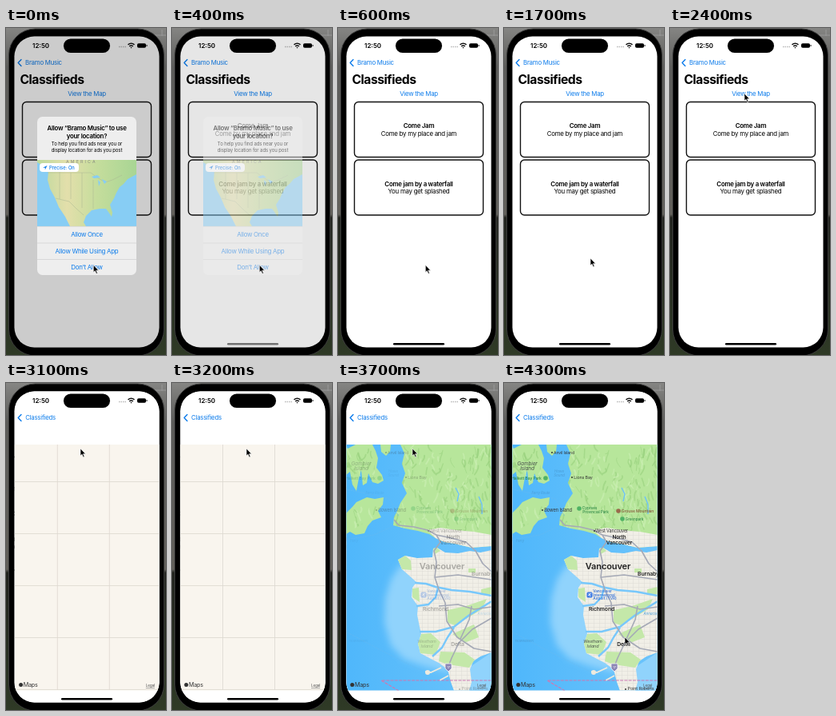
These frames come from a looping animation (200 by 409 pixels, 4.86 s). An HTML page:

```html
<!DOCTYPE html>
<html lang="en">
<head>
<meta charset="utf-8">
<title>Classifieds and map</title>
<style>
html, body { margin: 0; height: 100%; overflow: hidden; background: #333; }
svg { display: block; width: 100vw; height: 100vh; }
text { font: 7.87px Inter, "Open Sans", sans-serif; letter-spacing: -.25px; white-space: pre; }
.mid { text-anchor: middle; }
.bold { font-weight: 600; }
.link { fill: #0d7ceb; }
.road { fill: none; stroke: #a5a9b6; stroke-width: 1.6; stroke-linejoin: round; }
</style>
</head>
<body>
<svg viewBox="0 0 200 409" preserveAspectRatio="none">
  <defs>
    <clipPath id="screen"><rect x="10.5" y="10.5" width="181" height="389" rx="25"/></clipPath>
    <clipPath id="alertBox"><rect x="39" y="111" width="124" height="198" rx="6.5"/></clipPath>
    <clipPath id="mapBox"><rect x="10" y="77" width="182" height="307.5"/></clipPath>
    <clipPath id="alertMap"><rect x="39" y="165" width="124" height="83"/></clipPath>
    <linearGradient id="desk" x2="0" y2="1">
      <stop stop-color="#858583"/><stop offset=".12" stop-color="#5c5c5a"/>
      <stop offset=".57" stop-color="#62605b"/><stop offset=".58" stop-color="#22241f"/>
      <stop offset="1" stop-color="#2f3a26"/>
    </linearGradient>
    <linearGradient id="country">
      <stop stop-color="#bcd99c"/><stop offset=".3" stop-color="#e3dfab"/>
      <stop offset=".6" stop-color="#c5dd9c"/><stop offset="1" stop-color="#a8d594"/>
    </linearGradient>
    <linearGradient id="sea"><stop stop-color="#4fb7fb"/><stop offset="1" stop-color="#6cc4fb"/></linearGradient>
    <filter id="soft" x="-30%" y="-30%" width="160%" height="160%"><feGaussianBlur stdDeviation="4"/></filter>
    <pattern id="streets" width="7" height="5" patternUnits="userSpaceOnUse">
      <rect width="7" height="5" fill="#f1efe7"/><path d="M0 .5H7M.5 0V5" stroke="#dddbd4" stroke-width=".5"/>
    </pattern>
    <path id="north" d="M78 77L83 88 80 101 84 113 80 125 86 138 78 150 74 160 70 168 69 178 84 182 100 185 114 189 122 194 133 199 146 201 167 206 192 204V77Z"/>
    <path id="city" d="M75 221L84 216 99 219 118 218 119 207 124 206 134 212 150 213 165 210 178 212 192 209V337L178 342 169 348 165 358 167 374 164 385H145L141 374 137 358 126 350 118 346 103 338 100 326 104 314 102 305 99 290 100 279 92 268 93 256 98 249 88 240 80 233Z"/>
    <g id="isles">
      <path d="M10 83L22 77H43L47 85 50 94 48 106 55 115 57 122 50 126 43 124 38 113 36 125 31 128 29 109 26 119 23 135 18 127 15 111 10 115Z"/>
      <path d="M53 77H66L65 86 60 91 54 86Z"/>
      <path d="M10 163L18 155 23 149 36 143 46 145 57 143 56 152 50 160 54 168 43 172 37 179 33 188 22 190 15 186 10 189Z"/>
    </g>
  </defs>

  <rect width="200" height="409" fill="url(#desk)"/>
  <path d="M185 9h15M195 2v8" stroke="#999"/>
  <rect x="3.5" y="1" width="194" height="409" rx="33" stroke="#3c3c3c"/>

  <g clip-path="url(#screen)">
    <rect x="10" y="10" width="182" height="390" fill="#fff"/>
    <g id="list">
      <text id="title" x="17.5" y="70" style="font-size:15.7px;font-weight:700;letter-spacing:-.5px">Classifieds</text>
      <text class="mid link" x="101" y="85">View the Map</text>
      <g fill="none" stroke="#111" stroke-width="1.4">
        <rect x="20.5" y="92.5" width="161" height="69" rx="5"/>
        <rect x="20.5" y="165" width="161" height="69" rx="5"/>
      </g>
      <g id="first" class="mid">
        <text class="bold" x="101" y="125">Come Jam</text>
        <text x="101" y="134.5">Come by my place and jam</text>
      </g>
      <g id="second" class="mid">
        <text class="bold" x="101" y="198">Come jam by a waterfall</text>
        <text x="101" y="207">You may get splashed</text>
      </g>
    </g>
    <g id="page">
      <rect x="10" y="10" width="182" height="390" fill="#fff"/>
      <rect x="10" y="77" width="182" height="307.5" fill="#f9f5ee"/>
      <path d="M63.5 77V384M128.5 77V384M10 123.5H192M10 188.5H192M10 253.5H192M10 318.5H192M10 383.5H192" stroke="#dcd8d0" stroke-width=".8"/>
      <g clip-path="url(#mapBox)">
        <g id="tiles">
          <rect x="10" y="77" width="182" height="308" fill="url(#sea)"/>
          <path d="M78 228L66 246 59 270 58 300 66 328 82 345 108 354 140 362V228Z" fill="#90d3fc" filter="url(#soft)"/>
          <path d="M165 385V355L192 337V385Z" fill="#90d3fc"/>
          <g fill="#b7e69b"><use href="#north"/><use href="#isles"/></g>
          <clipPath id="woods"><use href="#north"/><path d="M10 77H43L47 120 10 115ZM15 160L50 147 46 168 15 185Z"/></clipPath>
          <g id="hills" clip-path="url(#woods)" fill="none" stroke-linecap="round"/>
          <path d="M112 184L128 181 148 184 170 186 192 190V204L167 206 146 201 133 199 122 194Z" fill="url(#streets)"/>
          <path d="M147 131l4 8-2 9M176 142l4 10 0 12" fill="none" stroke="#6bc2f8" stroke-width="1.4"/>
          <use href="#city" fill="url(#streets)"/>
          <g fill="#c4e8a9">
            <path d="M75 221L84 216 91 222 92 234 80 233ZM119 207L124 206 128 210 121 214ZM103 338L100 326 104 314 116 313 128 324 122 340ZM137 284L160 279 186 270 180 283 160 295 146 303 137 300ZM143 314L170 302 176 318 158 325ZM128 336L158 337 171 346 164 356 137 352 126 348ZM93 257L101 256 102 274 93 268ZM163 232h9v5h-9ZM179 258l13-3v9h-13Z"/>
          </g>
          <path d="M96 250L110 251 122 255 142 259 165 261 192 266M98 279L113 277 122 268 125 256M102 311L122 311 145 305 163 291 192 273M118 342L130 331 137 318 145 306" fill="none" stroke="#78c8fb" stroke-width="2.4"/>
          <path d="M129 356l-13 6-7-1M138 366l-11 6" fill="none" stroke="#eeeade" stroke-width="1.8"/>
          <circle cx="112" cy="362" r="3" fill="#eeeade"/>
          <g class="road">
            <path d="M70 171L76 178 95 180 112 184 123 190 142 194 160 199 172 210 181 226 192 236"/>
            <path d="M123 190L128 199 120 210 123 224 121 243 126 258 134 275 136 298 149 318 170 332 192 336"/>
            <path d="M137 357L142 344 151 325 168 308 192 294M126 279L150 277 170 283 192 280M121 243L150 240 192 246M153 320L164 296 167 279"/>
          </g>
          <path d="M76 385L54 372H192" fill="none" stroke="#cc79b4" stroke-width="1.2" stroke-dasharray="4 1.3"/>
          <path d="M10 133L40 139 65 145 76 167M10 196L45 190 69 179M10 311L55 335 107 361" fill="none" stroke="#69b9ee" stroke-width=".6" stroke-dasharray="2 1"/>
          <path d="M134 351h8v6l-4 4-4-4Z" fill="#8c86b5" stroke="#fff" stroke-width=".7"/>
          <text class="mid" x="138" y="357.3" fill="#fff" style="font-size:4px">17</text>
        </g>
        <g id="labels">
          <g fill="#4fb364"><circle cx="52" cy="119" r="2.8"/><circle cx="94" cy="157" r="2.8"/><circle cx="148" cy="170" r="2.8"/></g>
          <circle cx="143" cy="160" r="2.8" fill="#9a6a4c"/>
          <rect x="103.5" y="261.5" width="7" height="7" rx="1.5" fill="#3e7be5"/>
          <path d="M105 266l4-3M106 263l2 4" stroke="#fff" stroke-width=".9"/>
          <g fill="#333"><circle cx="60" cy="87" r="1"/><circle cx="85" cy="118" r="1"/><circle cx="48" cy="159" r="1"/><circle cx="113" cy="185" r="1"/><circle cx="152" cy="383" r="1"/></g>
        </g>
      </g>
      <circle cx="17.8" cy="377.5" r="2.5" fill="#333"/>
      <text x="21" y="380.2" fill="#333" style="font-size:7.2px">Maps</text>
      <text x="174" y="380" fill="#555" text-decoration="underline" style="font-size:4.8px">Legal</text>
    </g>
    <path d="M19 39.5L15.2 43.5 19 47.5" fill="none" stroke="#0d7ceb" stroke-width="1.4" stroke-linecap="round" stroke-linejoin="round"/>
    <text id="backOld" class="link" x="24" y="46.3">Bramo Music</text>
    <text id="backNew" class="link" x="24" y="46.3">Classifieds</text>
    <text class="bold" x="33" y="24.8" style="font-size:8px;letter-spacing:0">12:50</text>
    <path d="M141 23.5h9" stroke="#bbb" stroke-width="1.5" stroke-dasharray="1.5 1"/>
    <path d="M152.5 20.9q4-3.4 8 0M154.2 22.9q2.3-1.9 4.6 0" fill="none" stroke="#111" stroke-width="1.5"/>
    <path d="M155.4 24.3q1.1-.8 2.2 0L156.5 25.6Z"/>
    <rect x="164" y="19.3" width="11" height="5.4" rx="1.8"/><rect x="175.6" y="21" width=".9" height="2"/>
    <rect id="dim" x="10" y="10" width="182" height="390"/>
    <rect id="homeBar" x="69" y="394" width="64" height="2.4" rx="1.2"/>
  </g>
  <rect x="72" y="13.5" width="58" height="17.5" rx="8.7"/>

  <g id="alert" clip-path="url(#alertBox)">
    <rect x="39" y="111" width="124" height="198" fill="#eee"/>
    <g class="mid">
      <text class="bold" x="101" y="128">Allow “Bramo Music” to use</text>
      <text class="bold" x="101" y="138">your location?</text>
      <g id="reason"></g>
    </g>
    <g clip-path="url(#alertMap)">
      <rect x="39" y="165" width="124" height="83" fill="#87cdf4"/>
      <path d="M39 165H163V183L152 189 147 195 142 199 138 206 135 213 130 221 133 231 132 236 128 230 125 226 117 226 107 228 100 235 97 243 100 248H80L74 236 66 224 61 212 55 201 52 190 53 180 44 171 39 168Z" fill="url(#country)"/>
      <path d="M52 181H106L114 187 124 193 133 190 145 184M62 213L79 217 88 226 97 234M67 180V214M81 181V214M95 181V225M109 190V226" fill="none" stroke="#a9b792" stroke-width=".5"/>
      <path d="M107 186l7-2 4 3-8 1ZM115 190l1 8 2-5ZM120 189l6 3-3 3ZM125 198l7-3" fill="#87cdf4"/>
      <text x="75" y="169" fill="#868a80" style="font-size:5.2px;letter-spacing:2.2px">AMERICA</text>
    </g>
    <rect x="42" y="169" width="49" height="11" rx="4" fill="#fff"/>
    <path class="link" d="M46 174.7L51.5 172 48.8 177.5V174.7Z"/>
    <text class="link" x="54" y="176.6" style="font-size:5.8px;font-weight:500;letter-spacing:0">Precise: On</text>
    <path d="M39 248.3H163M39 269H163M39 289.5H163" stroke="#c9c9cb" stroke-width=".6"/>
    <g class="mid link">
      <text x="101" y="261.3">Allow Once</text>
      <text x="101" y="281.7">Allow While Using App</text>
      <text x="101" y="302">Don’t Allow</text>
    </g>
  </g>
  <path id="cursor" d="M0 0V9L2 7.2 3.6 10.8 5.1 10.2 3.5 6.7H6.4Z" stroke="#fff" stroke-width=".6"/>
</svg>
<script>
const $ = id => document.getElementById(id);

function add(parent, tag, attrs, content = '') {
  const el = document.createElementNS('http://www.w3.org/2000/svg', tag);
  for (const key in attrs) el.setAttribute(key, attrs[key]);
  el.textContent = content;
  $(parent).append(el);
}

['To help you find ads near you or', 'display location for ads you post'].forEach((line, i) =>
  add('reason', 'text', { x: 101, y: 147.3 + i * 7.8, style: 'font-size:6px;letter-spacing:-.1px' }, line));

// Scattered ridges over the forest
let seed = 7;
const random = () => (seed = seed * 16807 % 2147483647) / 2147483647;
for (let i = 0; i < 260; i++) {
  const x = 10 + random() * 182, y = 77 + random() * 108;
  add('hills', 'path', {
    d: `M${x} ${y}q${random() * 6 - 3} 4 ${random() * 10 - 5} ${4 + random() * 8}`,
    stroke: i % 3 ? '#98d07e' : '#cdf0b6', 'stroke-width': .8 + random() * 1.6, opacity: .6
  });
}

const looks = {
  city: 'font-weight:600;fill:#222', town: 'fill:#333', isle: 'font-style:italic;fill:#4c5550',
  park: 'font-weight:500;fill:#318a48', peak: 'font-weight:500;fill:#86543a',
  air: 'font-weight:500;fill:#316fd8', sea: 'font-style:italic;fill:#4b9ed8'
};
// Centre x, baseline, size, look, text
[
  [130, 233, 11, 'city', 'Vancouver'], [144, 195, 6.4, 'city', 'North'],
  [144, 202, 6.4, 'city', 'Vancouver'], [180.5, 241, 6.8, 'city', 'Burnaby'],
  [122, 285, 6.8, 'city', 'Richmond'], [149.5, 329, 6.8, 'city', 'Delta'],
  [75, 89, 5, 'town', 'Anvil Island'], [99, 119.5, 5.3, 'town', 'Lions Bay'],
  [67.5, 160.5, 5.7, 'town', 'Bowen Island'], [134.5, 187, 5.5, 'town', 'West Vancouver'],
  [171, 384.3, 5.4, 'town', 'Point Roberts'],
  [29, 102.5, 6.4, 'isle', 'Gambier'], [29, 109, 6.4, 'isle', 'Island'],
  [111, 325, 5.4, 'isle', 'Westham'], [111, 331, 5.4, 'isle', 'Island'],
  [28, 121, 5, 'park', 'Halkett Bay Park'], [107, 158, 4.8, 'park', 'Cypress'],
  [114.5, 163, 4.8, 'park', 'Provincial Park'], [163, 172, 4.6, 'park', 'Greenpark'],
  [167, 162, 5.1, 'peak', 'Grouse Mountain'],
  [123, 262, 4.8, 'air', 'Vancouver'], [125, 266.7, 4.8, 'air', 'International'],
  [126, 271.4, 4.8, 'air', 'Airport (YVR)'],
  [69, 112, 4.6, 'sea', 'Howe'], [69, 117, 4.6, 'sea', 'Sound'],
  [46, 139, 4.4, 'sea', 'Ferry Route'], [20, 199, 4.2, 'sea', 'Ferry'],
  [25, 324, 4, 'sea', 'Tsawwassen'], [183, 290, 4.6, 'sea', 'Annacis']
].forEach(([x, y, size, look, label]) => add('labels', 'text', {
  x, y, class: 'mid', style: `font-size:${size}px;letter-spacing:-.1px;${looks[look]}`
}, label));

const ramp = (t, from, to) => Math.min(1, Math.max(0, (t - from) / (to - from)));
const smooth = x => x * x * (3 - 2 * x);
const fade = (id, value) => $(id).setAttribute('opacity', value);
const move = (id, x, y = 0) => $(id).setAttribute('transform', `translate(${x} ${y})`);

// Time, x, y of the pointer
const pointer = [
  [0, 109.3, 296.5], [1700, 108, 288], [1800, 103, 247], [1900, 93, 180],
  [2000, 85, 115], [2100, 84, 82], [2200, 99, 85], [2300, 80, 70], [2400, 93, 82],
  [3900, 98, 103], [4000, 114, 166], [4100, 133, 243], [4200, 147, 302], [4300, 151, 318]
];

function push(t) {
  if (t >= 3200) return 1;
  const s = Math.max(0, t - 2680) * .018;
  return 1 - Math.exp(-s) * (1 + s);
}

function draw(now) {
  const t = Math.floor(now % 4860 / 100) * 100;

  const alert = 1 - smooth(ramp(t, 80, 600)) ** 1.7;
  fade('alert', alert);
  fade('dim', .2 * alert);
  fade('homeBar', 1 - alert);
  fade('first', ramp(t, 0, 600));
  fade('second', ramp(t, 250, 600));

  const slide = push(t);
  move('list', -55 * slide);
  move('page', 182 * (1 - slide));
  move('backOld', -30 * slide);
  move('backNew', 30 * (1 - slide));
  fade('title', 1 - slide);
  fade('backOld', 1 - ramp(slide, 0, .7));
  fade('backNew', ramp(slide, .3, 1));

  fade('tiles', ramp(t, 3200, 3700));
  fade('labels', ramp(t, 3500, 4100));

  const [, x, y] = pointer.findLast(p => p[0] <= t);
  move('cursor', x, y);
  requestAnimationFrame(() => draw(performance.now() - start));
}
const start = performance.now();
draw(0);
</script>
</body>
</html>
```
